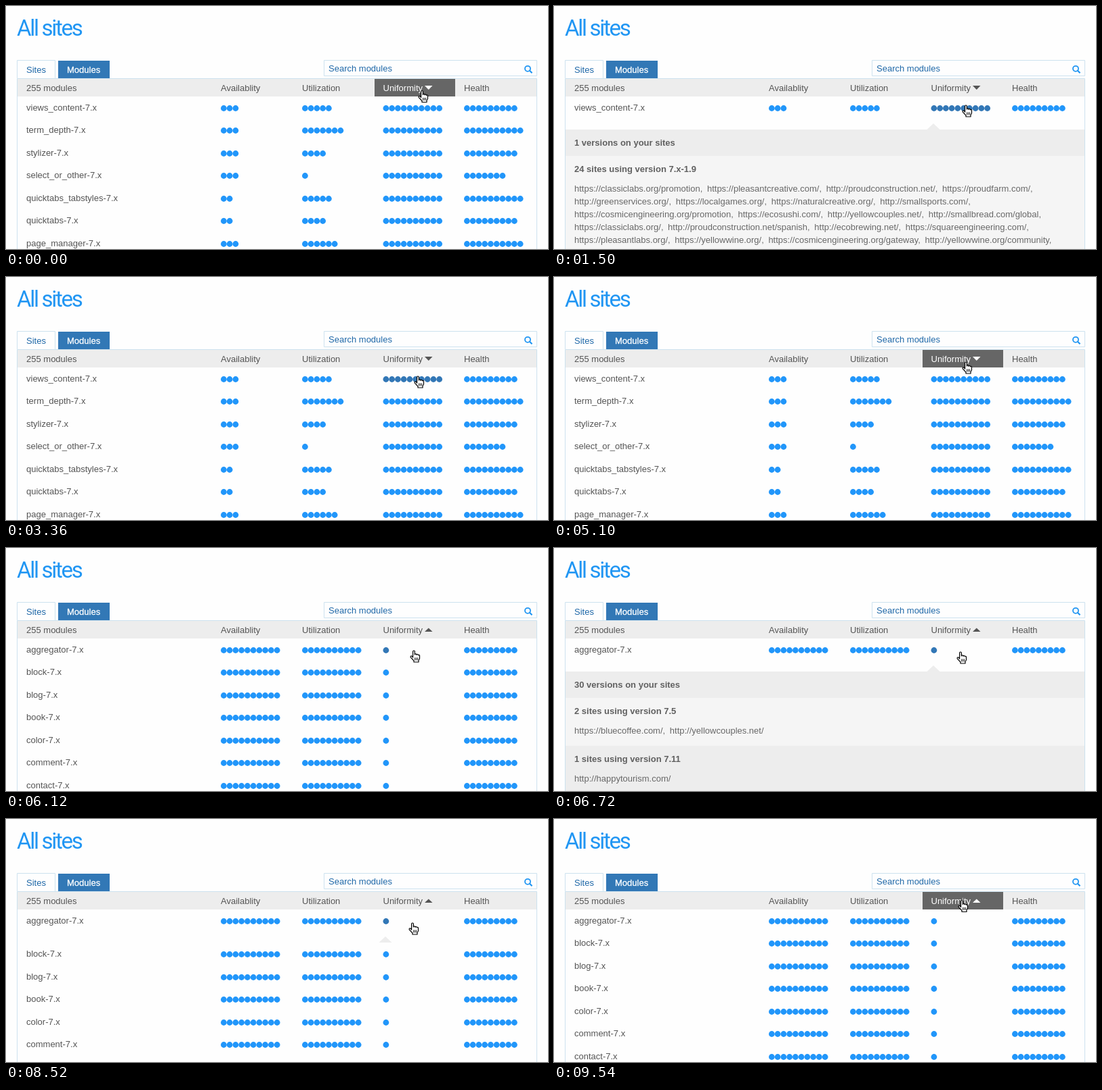
An HTML page that plays this animation: 800x360 px, repeating every 9960 ms.

```html
<!DOCTYPE html>
<html lang="en">
<head>
<meta charset="utf-8">
<title>All sites</title>
<style>
  html, body { margin: 0; width: 100%; height: 100%; overflow: hidden; background: #fefefe; }
  svg { display: block; width: 800px; height: 360px; }
  text { font: 13px "Liberation Sans", Arial, sans-serif; fill: #555; }
  .title { font: 33px Roboto, sans-serif; letter-spacing: -2.3px; fill: #2196f3; }
  .link { fill: #1f68a8; }
  .white { fill: #fff; }
  .bold { font-weight: bold; fill: #606060; }
  .url { fill: #686868; word-spacing: -.3px; }
  .dot { fill: #2196fa; }
  .active .dot { fill: #3277b6; }
  .frame { fill: none; stroke: #cde2ef; }
</style>
</head>
<body>
<svg viewBox="0 0 800 360">
  <text class="title" x="16" y="44">All sites</text>

  <path class="frame" d="M16.5 107V80.5H72.5V107M469.5 80.5H783.5V103.5H469.5Z"/>
  <text class="link" x="30" y="99">Sites</text>
  <rect x="77" y="81" width="76" height="26" fill="#3278b6"/>
  <text class="white" x="90" y="99" stroke="#fff" stroke-width=".3">Modules</text>
  <text class="link" x="476" y="97">Search modules</text>
  <g fill="none" stroke="#2196f3" stroke-width="1.8">
    <circle cx="770" cy="92.8" r="4"/>
    <path d="M773 95.8L776.5 99.3" stroke-width="2.2"/>
  </g>

  <rect x="17" y="108" width="766" height="26" fill="#ededed"/>
  <rect id="headerHover" x="544" y="108" width="119" height="26" fill="#666"/>
  <text x="30" y="126">255 modules</text>
  <text x="317" y="126">Availablity</text>
  <text x="437" y="126">Utilization</text>
  <g id="sortLabel">
    <text x="556.5" y="126">Uniformity</text>
    <path id="sortArrow"/>
  </g>
  <text x="676" y="126">Health</text>

  <g id="content"></g>
  <path class="frame" d="M16.5 360V107.5H783.5V360"/>

  <g id="cursor" stroke="#000" stroke-linejoin="round" stroke-linecap="round">
    <path fill="#fff" stroke-width="1.2" d="M4.6 11V2.4a1.4 1.4 0 0 1 2.8 0V7a1.3 1.3 0 0 1 2.6.3a1.3 1.3 0 0 1 2.5.6a1.1 1.1 0 0 1 2 .9V12.8L13 15.5V18H6V16L1.2 10.8a1.3 1.3 0 0 1 1.9-1.6Z"/>
    <path fill="none" stroke-width=".9" d="M7.6 11.8V15M9.6 11.8V15M11.6 11.8V15"/>
  </g>
</svg>
<script>
const LOOP = 9960, STEP = 60;
const COLUMNS = [317, 437, 556.5, 676];
const $ = id => document.getElementById(id);

// Module name followed by its four scores
const descending = [
  ['views_content', 3, 5, 10, 9], ['term_depth', 3, 7, 10, 10],
  ['stylizer', 3, 4, 10, 9], ['select_or_other', 3, 1, 10, 7],
  ['quicktabs_tabstyles', 2, 5, 10, 10], ['quicktabs', 2, 4, 10, 9],
  ['page_manager', 3, 6, 10, 10]
];
const ascending = ['aggregator', 'block', 'blog', 'book', 'color', 'comment', 'contact']
  .map(name => [name, 10, 10, 1, 9]);

const promotedSites = [
  'https://classiclabs.org/promotion, https://pleasantcreative.com/, http://proudconstruction.net/, https://proudfarm.com/,',
  'http://greenservices.org/, https://localgames.org/, https://naturalcreative.org/, http://smallsports.com/,',
  'https://cosmicengineering.org/promotion, https://ecosushi.com/, http://yellowcouples.net/, http://smallbread.com/global,',
  'https://classiclabs.org/, http://proudconstruction.net/spanish, http://ecobrewing.net/, https://squareengineering.com/,',
  'https://pleasantlabs.org/, https://yellowwine.org/, https://cosmicengineering.org/gateway, http://yellowwine.org/community,'
];

const text = (y, content, kind = '') => `<text class="${kind}" x="30" y="${y}">${content}</text>`;
const band = (y, height, fill) => `<rect x="17" y="${y}" width="766" height="${height}" fill="${fill}"/>`;
const urls = (y, line) => text(y, line.replaceAll(', ', ',\u00a0 '), 'url');

function dots(x, y, count) {
  return Array.from({ length: count }, (_, i) =>
    `<circle class="dot" cx="${x + 4.4 + i * 8.75}" cy="${y}" r="4.4"/>`).join('');
}

function row([name, ...scores], index, gap, hovered) {
  const y = Math.round(index * 33.45) + (index ? gap : 0);
  const cells = scores.map((score, column) =>
    `<g class="${hovered && !index && column === 2 ? 'active' : ''}">${dots(COLUMNS[column], 151.5 + y, score)}</g>`);
  return text(155 + y, name + '-7.x') + cells.join('');
}

const notch = '<path d="M550.5 183L560 174L569.5 183Z" fill="#ededed"/>';

const promotedPanel = notch + band(183, 39, '#ededed') + band(222, 138, '#f5f5f5') +
  text(207, '1 versions on your sites', 'bold') +
  text(246, '24 sites using version 7.x-1.9', 'bold') +
  promotedSites.map((line, i) => urls(275 + i * 19, line)).join('');

const versionsPanel = notch + band(183, 39, '#ededed') + band(222, 71, '#f5f5f5') + band(293, 67, '#ededed') +
  text(207, '30 versions on your sites', 'bold') +
  text(246, '2 sites using version 7.5', 'bold') +
  urls(275, 'https://bluecoffee.com/, http://yellowcouples.net/') +
  text(317, '1 sites using version 7.11', 'bold') +
  urls(346, 'http://happytourism.com/');

// Cursor moves: start time, number of steps, destination
const moves = [
  [720, 5, 602, 146], [3960, 4, 602, 125], [5760, 7, 596, 151],
  [6300, 1, 594, 153], [9060, 9, 596, 119.5]
];

function cursorAt(time) {
  let x = 608, y = 124.5;
  for (const [start, steps, toX, toY] of moves) {
    if (time < start) break;
    const p = Math.min(1, (Math.floor((time - start) / STEP) + 1) / steps);
    const eased = p * p * (3 - 2 * p);
    x += (toX - x) * eased;
    y += (toY - y) * eased;
  }
  return { x, y };
}

function contentAt(time, hovered) {
  const between = (from, to) => time >= from && time < to;
  const modules = time < 5160 ? descending : ascending;
  const panel = between(1500, 3360) ? promotedPanel : between(6720, 8520) ? versionsPanel : '';
  const closing = between(8520, 8580);
  const rows = panel ? modules.slice(0, 1) : modules;
  return rows.map((module, i) => row(module, i, closing ? 16 : 0, hovered)).join('') +
    panel + (closing ? notch : '');
}

let shown = '';
function draw(now) {
  const time = now % LOOP;
  const { x, y } = cursorAt(time);
  const onHeader = y < 133;
  const content = contentAt(time, y >= 140);
  if (content !== shown) $('content').innerHTML = shown = content;

  $('cursor').setAttribute('transform', `translate(${x} ${y})`);
  $('headerHover').style.display = onHeader ? '' : 'none';
  $('sortLabel').firstElementChild.setAttribute('class', onHeader ? 'white' : '');
  $('sortArrow').setAttribute('fill', onHeader ? '#fff' : '#555');
  $('sortArrow').setAttribute('d', time < 5160 ? 'M618 118H629.5L623.75 124Z' : 'M618 124H629.5L623.75 118.5Z');
  requestAnimationFrame(draw);
}
draw(performance.now());
</script>
</body>
</html>
```
